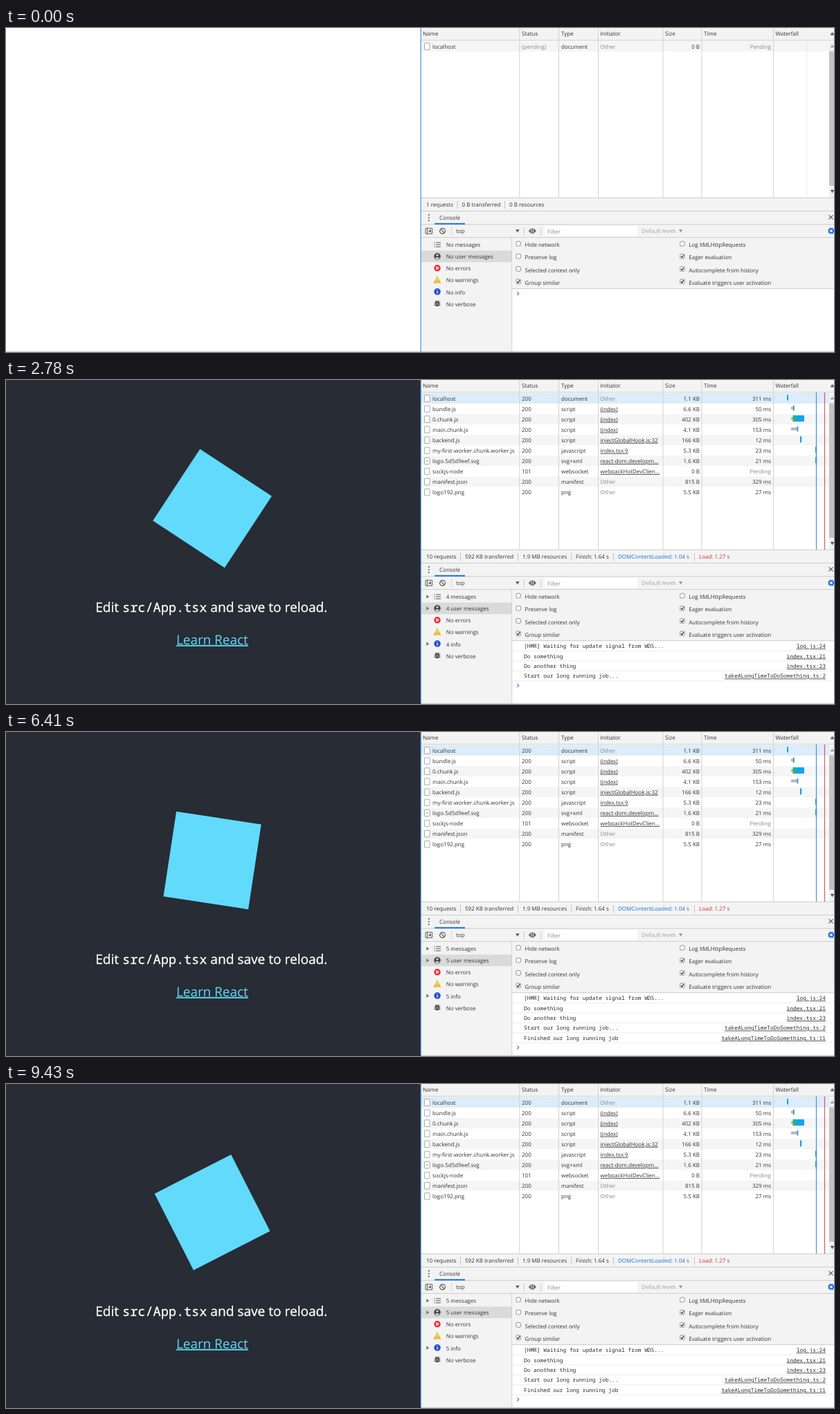
An HTML page that plays this animation: 1196x468 px, repeating every 9500 ms.

```html
<!DOCTYPE html>
<html lang="en">
<head>
<meta charset="utf-8">
<title>Worker demo</title>
<style>
  html, body { margin: 0; width: 100%; height: 100%; overflow: hidden; background: #fff; }
  svg { display: block; width: 1196px; height: 468px; text-rendering: geometricPrecision; }
  text { font: 8px "Open Sans", "Noto Sans", sans-serif; fill: #333; white-space: pre; }
  .mono { font: 7.85px "Noto Sans Mono", monospace; fill: #2b2b2b; }
  .page { font-size: 19.1px; fill: #fff; stroke: #fff; stroke-width: .3px; }
  .page tspan { font: 18.55px "Noto Sans Mono", monospace; }
  .page.link { font-size: 18.9px; fill: #61dafb; stroke: none; }
  .end { text-anchor: end; }
  .link { text-decoration: underline; }
  .dim { fill: #888; }
  .off { fill: #a3a3a3; }
  .blue { fill: #1a73d8; }
  .red { fill: #d02c2c; }
</style>
</head>
<body>
<svg viewBox="0 0 1196 468">
  <g id="tools"></g>
  <path d="M0 467.5H1196" stroke="#c6c6c6"/>
  <g id="page">
    <rect width="599" height="468" fill="#282c34"/>
    <rect id="spinner" x="236" y="123.5" width="124" height="124" fill="#61dafb"/>
    <text class="page" x="129.2" y="334.7">Edit <tspan>src/App.tsx</tspan> and save to reload.</text>
    <text class="page link" x="246" y="381.8">Learn React</text>
  </g>
  <path d="M599.2 0V468" stroke="#4593cc" stroke-width="1.2"/>
</svg>
<script>
const LOOP = 9500, SPIN_START = 930, DEG_PER_MS = 0.018;
const BAR = '#f3f3f3', EDGE = '#cdcdcd', INK = '#5a5a5a';

// What the tools show from each moment on; "done" counts finished requests.
const states = [
  { at: 0, rows: 1, done: 0, logs: 0, sum: ['1 requests', '0 B transferred', '0 B resources'], sumX: [607, 658.5, 727] },
  { at: 250, rows: 1, done: 1, logs: 0, sum: ['1 requests', '1.1 KB transferred', '1.6 KB resources'], sumX: [607, 658.5, 739] },
  { at: 390, rows: 4, done: 1, logs: 0, sum: ['4 requests', '1.1 KB transferred', '1.6 KB resources'], sumX: [607, 658.5, 739] },
  { at: 620, rows: 5, done: 5, logs: 0, sum: ['5 requests', '580 KB transferred', '1.9 MB resources'], sumX: [607, 658.5, 741] },
  { at: 780, rows: 5, done: 5, logs: 1 },
  { at: 930, rows: 8, done: 8, logs: 3, sum: ['8 requests', '587 KB transferred', '1.9 MB resources', 'Finish: 1.27 s', 'DOMContentLoaded: 1.04 s', 'Load: 1.27 s'], sumX: [607, 663, 746, 823, 884, 1001] },
  { at: 1080, rows: 10, done: 10, logs: 4, sum: ['10 requests', '592 KB transferred', '1.9 MB resources', 'Finish: 1.64 s', 'DOMContentLoaded: 1.04 s', 'Load: 1.27 s'] },
  { at: 5950, logs: 5 }
];
states.forEach((s, i) => { if (i) states[i] = { ...states[i - 1], ...s }; });

const requests = `localhost,200,document,Other,1.1 KB,311 ms
bundle.js,200,script,(index),6.6 KB,50 ms
0.chunk.js,200,script,(index),402 KB,305 ms
main.chunk.js,200,script,(index),4.1 KB,153 ms
backend.js,200,script,injectGlobalHook.js:32,166 KB,12 ms
my-first-worker.chunk.worker.js,200,javascript,index.tsx:9,5.3 KB,23 ms
logo.5d5d9eef.svg,200,svg+xml,react-dom.developm...,1.6 KB,21 ms
sockjs-node,101,websocket,webpackHotDevClien...,0 B,Pending
manifest.json,200,manifest,Other,815 B,329 ms
logo192.png,200,png,Other,5.5 KB,27 ms`.split('\n').map(r => r.split(','));

const logs = [
  ['[HMR] Waiting for update signal from WDS...', 'log.js:24'],
  ['Do something', 'index.tsx:21'],
  ['Do another thing', 'index.tsx:23'],
  ['Start our long running job...', 'takeALongTimeToDoSomething.ts:2'],
  ['Finished our long running job', 'takeALongTimeToDoSomething.ts:11']
];

// Waterfall bars: row, x, width, height, colour
const TEAL = '#1aa3b8', SKY = '#0ca4f4', GREY = '#b5b5b5';
const bars = [
  [0, 1128, 2, 8, TEAL], [0, 1111, 1, 4, '#ddd'],
  [1, 1134, 3, 4, GREY], [1, 1137, 1.7, 8, TEAL],
  [2, 1134, 3, 4, GREY], [2, 1136.5, 5, 9, '#22b573'], [2, 1141, 12, 9, SKY],
  [3, 1134, 9, 4, GREY], [3, 1142.7, 1.6, 8, TEAL],
  [4, 1147, 2.2, 9, SKY], [5, 1169, 2.2, 9, TEAL], [6, 1169, 2.2, 9, TEAL],
  [7, 1182.5, 1, 6, '#ddd'], [8, 1182.5, 1, 6, '#ddd']
];

const text = (x, y, s, cls = '') => `<text x="${x}" y="${y}" class="${cls}">${s}</text>`;
const rect = (x, y, w, h, fill, more = '') => `<rect x="${x}" y="${y}" width="${w}" height="${h}" fill="${fill}" ${more}/>`;
const line = (d, color = EDGE, w = 1) => `<path d="${d}" fill="none" stroke="${color}" stroke-width="${w}"/>`;
const fill = (d, color = INK) => `<path d="${d}" fill="${color}"/>`;
const dot = (x, y, r, color) => `<circle cx="${x}" cy="${y}" r="${r}" fill="${color}"/>`;
const down = (x, y, color = INK) => fill(`M${x - 2.7} ${y - 2.2}h5.4l-2.7 4.6z`, color);
const up = (x, y, color = INK) => fill(`M${x - 3} ${y + 2.3}h6l-3 -4.6z`, color);

function network(s) {
  let out = '';
  for (let i = 0; i < s.rows; i++) {
    const y = 19 + 15.06 * i, base = y + 10.6;
    const [name, status, type, from, size, time] = requests[i];
    const done = i < s.done, wait = !done || time === 'Pending';
    const back = i === 0 && s.at >= 390 ? '#dcecfb' : i % 2 ? '#fff' : '#f5f5f5';
    out += rect(600, y, 589, 15, back)
      + rect(604.5, y + 2.8, 7.5, 9.5, '#fff', 'stroke="#a9a9a9" rx=".5"')
      + (name.endsWith('svg') ? dot(608, y + 7.8, 1, '#999') : '')
      + text(616, base, name)
      + text(745, base, done ? status : '(pending)', done ? '' : 'dim')
      + text(802, base, type)
      + text(858.5, base, from, from === 'Other' ? 'dim' : 'link')
      + text(1002, base, done ? size : '0 B', 'end')
      + text(1105, base, wait ? 'Pending' : time, wait ? 'end dim' : 'end');
  }
  out += rect(600, 0, 596, 18, BAR) + line('M600 17.8H1196');
  out += line('M741.8 0V245M798.5 0V245M855.5 0V245M949 0V245M1005 0V245M1108.5 0V245', '#d2d2d2');
  if (s.at < 390) out += line('M1156.5 18V245', '#e9e9e9');
  const heads = ['Name', 'Status', 'Type', 'Initiator', 'Size', 'Time', 'Waterfall'];
  [602, 745, 802, 858.5, 952, 1008, 1111.5].forEach((x, i) => out += text(x, 11.3, heads[i]));
  for (const [row, x, w, h, color] of bars)
    if (row < s.done) out += rect(s.at < 390 && w === 2 ? 1114 : x, 25.5 + 15.06 * row - h / 2, w, h, color);
  if (s.at >= 930) out += line('M1170.5 18V245', '#4a8fd6', 1.2) + line('M1182.5 18V245', '#cf5f5f', 1.2);
  out += rect(1189, 18, 7, 227, '#f1f1f1') + rect(1189, 33.5, 7, 194.5, '#c1c1c1')
    + up(1193.5, 8) + up(1193.5, 26, '#a5a5a5') + down(1193.5, 236);

  out += rect(600, 245, 596, 58, BAR) + line('M600 245.3H1196M600 264.5H1196');
  s.sum.forEach((label, i) => {
    const x = s.sumX[i];
    out += text(x, 258.3, label, ['', '', '', '', 'blue', 'red'][i]);
    if (i) out += line(`M${x - 6.5} 250V261`, '#c4c4c4');
  });
  return out;
}

function toolbar() {
  return [270, 274, 278].map(y => dot(610.8, y, 1.1, INK)).join('')
    + text(626, 277.2, 'Console')
    + line('M600 283.7H1196M600 302.6H1196')
    + rect(619, 281.8, 44, 2, '#1a73e8')
    + line('M1188.5 270.3l6 6m0 -6l-6 6', INK, 1.2)
    + line('M606 289.2h9.6v8h-9.6zM608.6 289v8', INK) + fill('M613.8 290.8v5l-3.6 -2.5z')
    + `<circle cx="630.5" cy="293.3" r="3.9" fill="none" stroke="${INK}" stroke-width="1.2"/>`
    + line('M627.8 290.6l5.4 5.4', INK, 1.2)
    + line('M643.5 288V299M748.5 288V299M772.5 288V299')
    + text(650, 296.4, 'top') + down(738.8, 293.2)
    + fill('M754.8 293.2q5.5 -7.4 11 0q-5.5 7.4 -11 0z') + dot(760.3, 293.2, 2.3, BAR) + dot(760.3, 293.2, 1.3, INK)
    + rect(778, 286, 134, 14, '#fff') + text(782, 296.6, 'Filter', 'dim')
    + text(918, 296.4, 'Default levels', 'off') + down(974.5, 293.2, '#999')
    + `<circle cx="1192" cy="293" r="3.9" fill="none" stroke="#1a73e8" stroke-width="1.8" stroke-dasharray="2 1.06"/>`
    + `<circle cx="1192" cy="293" r="2.7" fill="none" stroke="#1a73e8" stroke-width="1.7"/>`;
}

function sidebar(n) {
  const count = (word, plural) => (n || 'No') + ' ' + word + (plural && n !== 1 ? 's' : '');
  const labels = [count('message', 1), count('user message', 1), 'No errors', 'No warnings', count('info'), 'No verbose'];
  let out = rect(600, 303, 130.5, 164, BAR) + rect(600, 321.5, 130.5, 16.8, '#dadada') + line('M730.7 303V467');
  labels.forEach((label, i) => {
    const y = 313 + 17.05 * i;
    out += text(635.7, y + 3.3, label);
    if (n && [0, 1, 4].includes(i)) out += fill(`M607.3 ${y - 2.7}v5.2l4 -2.6z`, '#6e6e6e');
  });
  return out
    + line('M621 310H628M621 313H628M621 316H628M618.3 310h1.5M618.3 313h1.5M618.3 316h1.5', INK, 1.2)
    + dot(623, 329.8, 4.8, '#4a4a4a') + dot(623, 328, 1.6, '#dadada') + fill('M619.8 332.6q3.2 -2.8 6.4 0q-3.2 3 -6.4 0z', '#dadada')
    + dot(623, 346.8, 4.8, '#e0393e') + line('M621.2 345l3.6 3.6m0 -3.6l-3.6 3.6', '#fff', 1.2)
    + fill('M623 358.6l5.5 9.8h-11z', '#f0b41c') + line('M623 361.8v3.2m0 .8v1.3', '#fff', 1.1)
    + dot(623, 380.8, 4.8, '#2a52d0') + line('M623 377.9v1.2m0 .9v3.6', '#fff', 1.2)
    + `<ellipse cx="623" cy="398.3" rx="2.9" ry="4" fill="#4a4a4a"/>`
    + line('M618.6 396h8.8M618.6 398.3h8.8M618.6 400.6h8.8M620.7 393.4l1.4 1.6M625.3 393.4l-1.4 1.6', '#4a4a4a')
    + line('M621.8 397.2h2.4m-2.4 2.2h2.4', BAR, .8);
}

function options() {
  const names = ['Hide network', 'Preserve log', 'Selected context only', 'Group similar',
    'Log XMLHttpRequests', 'Eager evaluation', 'Autocomplete from history', 'Evaluate triggers user activation'];
  let out = rect(731.2, 303, 465, 73.5, BAR) + line('M731 376.6H1196');
  names.forEach((name, i) => {
    const x = i < 4 ? 737 : 973.7, y = 308.4 + 18.2 * (i % 4);
    out += rect(x, y, 6.4, 6.4, '#fff', 'stroke="#8b8b8b" stroke-width=".9" rx="1"') + text(x + 12.6, y + 7.7, name);
    if (i === 3 || i > 4) out += line(`M${x + 1.3} ${y + 3.3}l1.5 1.6l2.5 -3.7`, '#333', 1.3);
  });
  return out;
}

function messages(n) {
  let out = '';
  logs.slice(0, n).forEach(([msg, link], i) => {
    const y = 387.2 + 14.4 * i;
    out += text(748, y, msg, 'mono') + text(1184, y, link, 'mono link end') + line(`M731 ${y + 4.2}H1196`, '#ececec');
  });
  return out + line(`M738.3 ${381.2 + 14.4 * n}l2.4 2.4l-2.4 2.4`, '#367cf1', 1.2);
}

const $ = id => document.getElementById(id);
const start = performance.now();
let shown;

function draw() {
  const t = (performance.now() - start) % LOOP;
  const s = states.filter(x => x.at <= t).pop();
  if (s !== shown) {
    shown = s;
    $('tools').innerHTML = rect(599, 0, 597, 468, '#fff') + network(s) + toolbar()
      + sidebar(s.logs) + options() + messages(s.logs);
    $('page').style.display = t < SPIN_START ? 'none' : '';
  }
  $('spinner').setAttribute('transform', `rotate(${(t - SPIN_START) * DEG_PER_MS} 298 185.5)`);
  requestAnimationFrame(draw);
}
draw();
</script>
</body>
</html>
```
